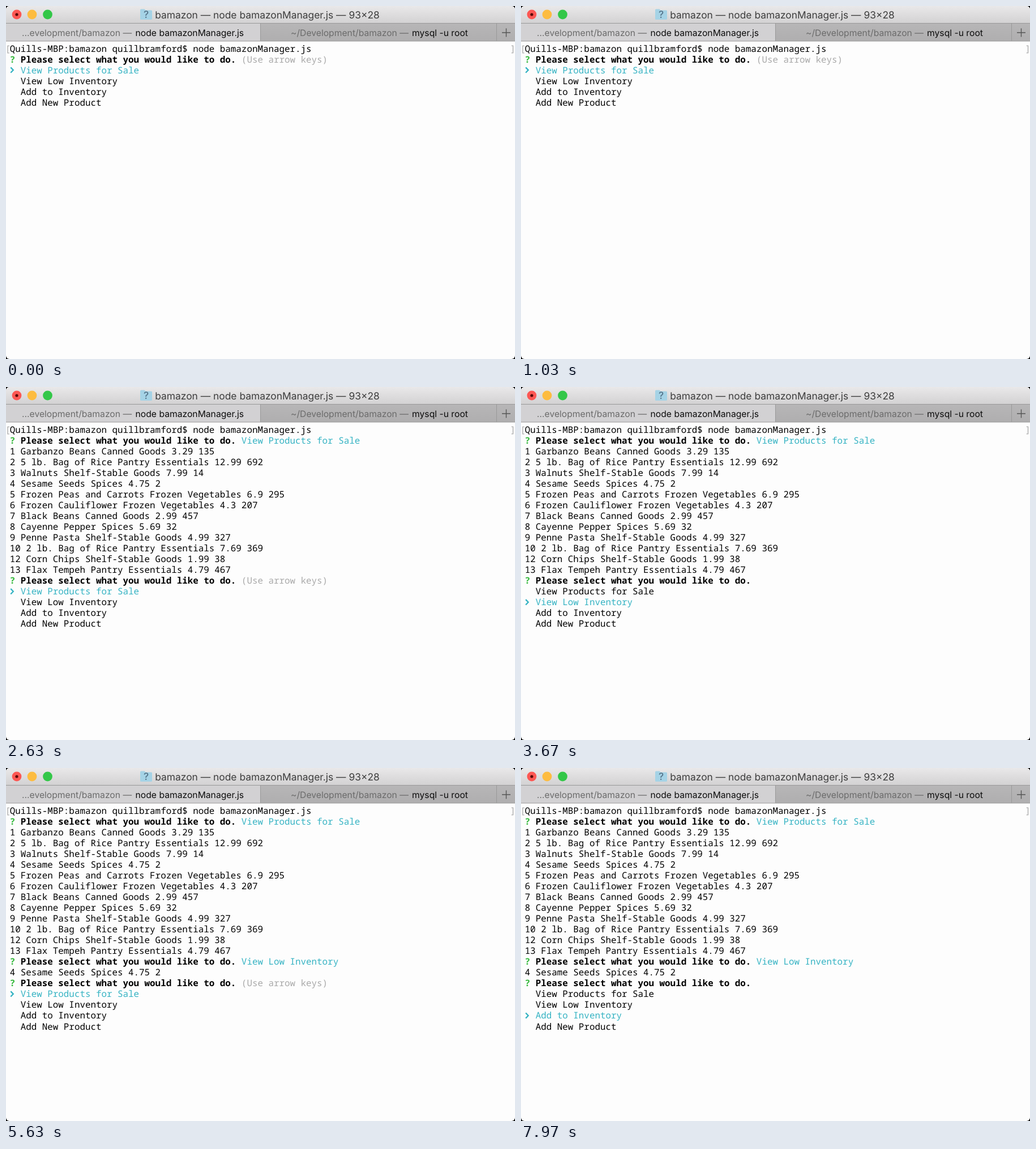
Write an HTML page that moves like this. It is 899 by 623 pixels and loops after 8 s.

```html
<!DOCTYPE html>
<html lang="en">
<head>
<meta charset="utf-8">
<title>Terminal</title>
<style>
  html, body { margin: 0; width: 100%; height: 100%; overflow: hidden; background: #000; }
  svg { display: block; }
  text { white-space: pre; text-rendering: geometricPrecision; }
  .title, .tab { font-family: Inter, Roboto, sans-serif; }
  .title { font-size: 17.4px; fill: #3d3d3d; }
  .tab { font-size: 15.7px; fill: #0c0c0c; }
  .dim { fill: #6b6b6b; }
  .mono { font: 500 15.87px "Noto Sans Mono", "DejaVu Sans Mono", monospace; fill: #000; }
  .bold { font-weight: 700; }
  .green { fill: #35b83c; font-weight: 700; }
  .cyan { fill: #35b3c3; }
  .gray { fill: #a9a9a9; }
  .icon { fill: #55748a; font-weight: 500; }
</style>
</head>
<body>
<svg width="899" height="623" viewBox="0 0 899 623">
  <defs>
    <linearGradient id="bar" x2="0" y2="1">
      <stop stop-color="#e9e8e9"/><stop offset="1" stop-color="#d2d1d2"/>
    </linearGradient>
    <linearGradient id="idle" x2="0" y2="1">
      <stop stop-color="#b7b6b7"/><stop offset="1" stop-color="#afaeaf"/>
    </linearGradient>
    <clipPath id="window"><rect width="899" height="623" rx="6"/></clipPath>
  </defs>
  <g clip-path="url(#window)">
    <rect width="899" height="623" fill="#fdfdfd"/>
    <rect width="899" height="31" fill="url(#bar)"/>
    <rect y="31" width="450" height="31" fill="#d2d1d3"/>
    <rect x="450" y="31" width="449" height="31" fill="url(#idle)"/>
    <path d="M0 30.5H899M449.5 31V62M866.5 31V62M0 62H899" stroke="#999" fill="none"/>
    <path d="M876 47H891M883.5 39.5V54.5" stroke="#555" stroke-width="1.4"/>

    <circle cx="19" cy="15" r="8.4" fill="#fc5753"/>
    <circle cx="19" cy="15" r="2.6" fill="#590906"/>
    <circle cx="46" cy="15" r="8.4" fill="#fdbc40"/>
    <circle cx="73.5" cy="15" r="8.4" fill="#33c748"/>

    <path d="M237 7q0-1.5 1.5-1.5h6l2 2h10q1.5 0 1.5 1.5v13.5q0 1.5-1.5 1.5h-18q-1.5 0-1.5-1.5z" fill="#a5d3e6"/>
    <text class="title icon" x="247.5" y="21" text-anchor="middle">?</text>
    <text class="title" x="461.5" y="21.5" text-anchor="middle">bamazon — node bamazonManager.js — 93×28</text>
    <text class="tab dim" x="28" y="53">…evelopment/bamazon —</text>
    <text class="tab" x="420" y="53" text-anchor="end">node bamazonManager.js</text>
    <text class="tab dim" x="711" y="53" text-anchor="end">~/Development/bamazon —</text>
    <text class="tab" x="766.5" y="53" text-anchor="middle">mysql -u root</text>

    <text class="mono gray" x="-1.5" y="80.5">[</text>
    <text class="mono gray" x="890.5" y="80.5">]</text>
    <g id="screen"></g>
  </g>
</svg>
<script>
const LOOP = 8000, ROW = 19.05, LEFT = 6.7, BASELINE = 80.5;
const screen = document.getElementById('screen');
const options = ['View Products for Sale', 'View Low Inventory', 'Add to Inventory', 'Add New Product'];
const lowStock = '4 Sesame Seeds Spices 4.75 2';
const products = [
  '1 Garbanzo Beans Canned Goods 3.29 135',
  '2 5 lb. Bag of Rice Pantry Essentials 12.99 692',
  '3 Walnuts Shelf-Stable Goods 7.99 14',
  lowStock,
  '5 Frozen Peas and Carrots Frozen Vegetables 6.9 295',
  '6 Frozen Cauliflower Frozen Vegetables 4.3 207',
  '7 Black Beans Canned Goods 2.99 457',
  '8 Cayenne Pepper Spices 5.69 32',
  '9 Penne Pasta Shelf-Stable Goods 4.99 327',
  '10 2 lb. Bag of Rice Pantry Essentials 7.69 369',
  '12 Corn Chips Shelf-Stable Goods 1.99 38',
  '13 Flax Tempeh Pantry Essentials 4.79 467',
];

const span = (style, text) => `<tspan class="${style}">${text}</tspan>`;
const question = (tail = '') =>
  span('green', '?') + span('bold', ' Please select what you would like to do. ') + tail;
const answered = i => question(span('cyan', options[i]));
const menu = (selected, hint) => [
  question(hint ? span('gray', '(Use arrow keys)') : ''),
  ...options.map((text, i) => i === selected ? span('cyan', '  ' + text) : '  ' + text),
];

const command = 'Quills-MBP:bamazon quillbramford$ node bamazonManager.js';
const afterList = [answered(0), ...products];
const afterLow = [...afterList, answered(1), lowStock];

// Each step: start time, lines above the menu, selected option, hint shown
const steps = [
  [0, [], 0, true],
  [1270, afterList, 0, true],
  [2930, afterList, 1, false],
  [4600, afterLow, 0, true],
  [6930, afterLow, 1, false],
  [7750, afterLow, 2, false],
];

function render([, history, selected, hint]) {
  const lines = [command, ...history, ...menu(selected, hint)];
  const yOf = row => BASELINE + row * ROW;
  const pointerY = yOf(history.length + 2 + selected) - 10.2;
  screen.innerHTML =
    lines.map((line, row) => `<text class="mono" x="${LEFT}" y="${yOf(row)}">${line}</text>`).join('') +
    `<path d="M8.3 ${pointerY}l4.5 4.7l-4.5 4.7" fill="none" stroke="#35b3c3" stroke-width="2.3"/>`;
}

let shown;
function tick() {
  const time = performance.now() % LOOP;
  const step = steps.findLast(([start]) => start <= time);
  if (step !== shown) render(shown = step);
  requestAnimationFrame(tick);
}
tick();
</script>
</body>
</html>
```
